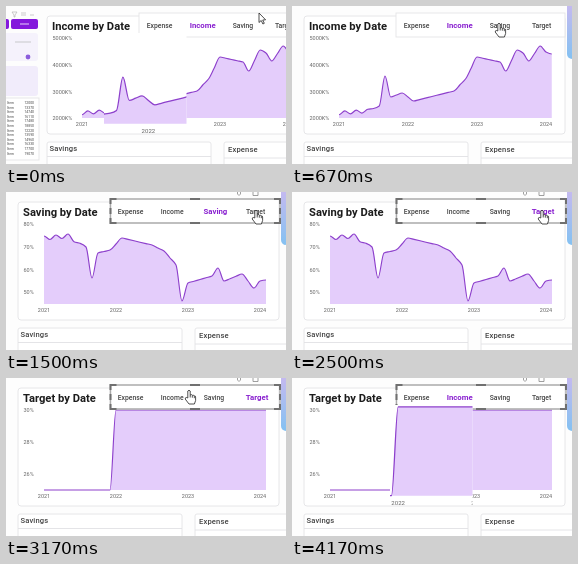
Recreate the animation shown at these times as an HTML page. Size 280x158 px, loop 4340 ms.

```html
<!DOCTYPE html>
<html lang="en">
<head>
<meta charset="utf-8">
<title>Dashboard tabs</title>
<style>
html, body { margin: 0; width: 100%; height: 100%; overflow: hidden; background: #fdfdfd; }
svg { display: block; width: 100vw; height: 100vh; }
text { font-family: Roboto, "Open Sans", sans-serif; fill: #444; }
.title { font-size: 11.2px; font-weight: 700; fill: #1c1c1c; }
.tab { font-size: 6.8px; font-weight: 500; text-anchor: middle; }
.tab.on { font-size: 7.8px; font-weight: 700; fill: #8a22d0; }
.axis { font-size: 5.5px; fill: #666; }
.year { text-anchor: middle; }
.head { font-size: 7.6px; font-weight: 500; letter-spacing: .15px; }
.tiny { font-size: 3.4px; text-anchor: end; }
.card { fill: #fff; stroke: #e4e4e6; stroke-width: .9; }
.area { fill: #e4cdfb; }
.line { fill: none; stroke: #8d40cc; stroke-width: 1.15; stroke-linejoin: round; }
</style>
</head>
<body>
<svg viewBox="0 0 280 158" preserveAspectRatio="none">
  <defs>
    <clipPath id="lens"><rect x="98" y="27" width="82.5" height="100"/></clipPath>
    <linearGradient id="side" x2="0" y2="1">
      <stop offset="0" stop-color="#cdb8f0"/><stop offset=".5" stop-color="#a9bdf0"/><stop offset="1" stop-color="#83c1f2"/>
    </linearGradient>
  </defs>
  <rect width="280" height="158" fill="#fdfdfd"/>

  <g id="menu">
    <path d="M6 6h5l-2 3v2h-1v-2zM15 7h5M15 9h5M24 9h4" fill="none" stroke="#aaa" stroke-width=".6"/>
    <rect x="-10" y="13" width="13" height="10" rx="2" fill="#8418dc"/>
    <rect x="5" y="13" width="27" height="10" rx="2" fill="#8418dc"/>
    <path d="M14 18h9" stroke="#e6d0fa"/>
    <rect x="-10" y="27" width="42" height="28" rx="3" fill="#f5f2fc"/>
    <rect x="-10" y="60" width="42" height="30" rx="3" fill="#f1ecfb"/>
    <path d="M9 36h16" stroke="#bbb" stroke-width=".8"/>
    <circle cx="22" cy="51" r="2.4" fill="#8b5cdc"/>
    <rect x="-10" y="92" width="43" height="62" class="card"/>
    <g id="rows"></g>
  </g>

  <g id="page">
    <rect x="12" y="10" width="261" height="118" rx="3" class="card"/>
    <g id="plot"></g>
    <rect x="12" y="136" width="164" height="40" rx="2" class="card"/>
    <rect x="189" y="136" width="164" height="40" rx="2" class="card"/>
    <path d="M12 150.5h164M189 152h164" stroke="#e1e1e5" stroke-width=".9"/>
    <text x="14.5" y="145" class="head">Savings</text>
    <text x="193" y="146" class="head">Expense</text>
    <rect x="275" y="-8" width="30" height="61" rx="5" fill="url(#side)"/>
  </g>

  <g id="front">
    <text id="title" x="17" y="24" class="title"></text>
    <rect x="104" y="7" width="169" height="24" class="card"/>
    <g id="tabs"></g>
    <path id="icons" d="M231.500 0v2l1.500 1.500 1.500-1.500v-2M247 0v3.500h5v-3.500" fill="none" stroke="#888" stroke-width=".8"/>
    <g id="frame" fill="none">
      <rect x="104.5" y="7" width="169.5" height="24" stroke="#aaa" stroke-width="1.4"/>
      <path d="M104.500 12v-5h6M184 7h10M268 7h6v5M274 16v6M274 26v5h-6M194 31h-10M110.500 31h-6v-5M104.500 22v-6" stroke="#707070" stroke-width="2"/>
    </g>
  </g>

  <g id="lensView" clip-path="url(#lens)">
    <rect x="98" y="27" width="85" height="100" fill="#fff"/>
    <g id="zoom"><use href="#plot"/></g>
  </g>

  <g id="hand" fill="#fff" stroke="#222" stroke-width=".8" stroke-linejoin="round">
    <path d="M-1.200 8V1Q0-.6 1.200 1V5Q2.500 4 3.300 5.300Q4.600 4.500 5.300 6Q6.500 5.600 6.600 7V10.500L5.400 14H0L-3.800 9Q-3.700 7.200-2.300 7.500Z"/>
    <path d="M1.200 5v2.500M3.300 5.500v2.200M5.300 6.200v2"/>
  </g>
  <path id="arrow" d="M0 0V9.500L2.200 7.500L3.900 11L5.300 10.300L3.700 7L6.600 6.800Z" fill="#fff" stroke="#222" stroke-width=".8"/>
</svg>
<script>
const LOOP = 4340, TICK = 1000 / 6, LAST = 25, MONTHS = 38, BASE = 112;
const $ = id => document.getElementById(id);
const label = (x, y, cls, s) => `<text x="${x}" y="${y}" class="${cls}">${s}</text>`;

// Linear interpolation through keys of the form [position, ...values].
function between(keys, pos) {
  const i = Math.max(1, keys.findIndex(k => k[0] >= pos));
  const [a, b] = [keys[i - 1], keys[i]];
  const u = (pos - a[0]) / (b[0] - a[0]);
  return a.slice(1).map((v, j) => v + (b[j + 1] - v) * u);
}

// Keys are [month, height]; ripple is the early month-to-month wobble.
const charts = {
  Income: {
    start: 47, month: 5.75, ripple: 1.7, top: 5000, step: 1000, unit: 'K%', gap: 26.8,
    keys: [[0, 107], [5, 105], [7, 100], [8, 70], [9, 91], [11, 87], [13, 95], [20, 85], [22, 73], [24, 51],
      [28, 56], [29, 65], [31, 44], [32, 47], [33, 55], [35, 40], [36, 46], [37, 48]]
  },
  Saving: {
    start: 38, month: 6, ripple: -2, top: 80, step: 10, unit: '%', gap: 22.8,
    keys: [[0, 46], [4, 44], [7, 55], [8, 86], [9, 61], [11, 58], [13, 46], [18, 53], [20, 59], [22, 73],
      [23, 109], [24, 91], [28, 84], [29, 76], [30, 89], [33, 82], [35, 96], [36, 89], [37, 88]]
  },
  Target: {
    start: 38, month: 6, ripple: 0, top: 30, step: 2, unit: '%', gap: 32.2,
    keys: [[0, BASE], [11, BASE], [12, 32], [37, 32]]
  }
};

// Monotone cubic through evenly spaced heights.
function smoothPath(x0, dx, ys) {
  const slope = ys.map((y, i) => {
    const before = y - ys[i - 1], after = ys[i + 1] - y;
    return before * after > 0 ? 2 * before * after / (before + after) : 0;
  });
  return ys.map((y, i) => {
    const x = x0 + i * dx;
    if (!i) return `M${x} ${y}`;
    return `C${x - dx * 2 / 3} ${ys[i - 1] + slope[i - 1] / 3} ${x - dx / 3} ${y - slope[i] / 3} ${x} ${y}`;
  }).join('');
}

function drawChart(name) {
  const { start, month, ripple, top, step, unit, gap, keys } = charts[name];
  const heights = Array.from({ length: MONTHS }, (_, m) =>
    between(keys, m)[0] + (m < 6 ? ripple * Math.cos(Math.PI * m) : 0));
  const path = smoothPath(start, month, heights);
  let marks = '';
  for (let i = 0; 34 + i * gap < 116; i++) marks += label(17.5, 34 + i * gap, 'axis', top - i * step + unit);
  for (let i = 0; i < 4; i++) marks += label(start + i * 12 * month, 120, 'axis year', 2021 + i);
  $('plot').innerHTML =
    `<path class="area" d="${path}V${BASE}H${start}Z"/><path class="line" d="${path}"/>${marks}`;
  $('title').textContent = name + ' by Date';
}

function drawTabs(active) {
  $('tabs').innerHTML = ['Expense', 'Income', 'Saving', 'Target'].map((s, i) => {
    const x = 124.5 + i * 41.7;
    return s === active ? label(x + 1.5, 22, 'tab on', s) : label(x, 22, 'tab', s);
  }).join('');
}

// Steps are [first tick, value]; values hold until the next step.
const chartSteps = [[0, 'Income'], [9, 'Saving'], [17, 'Target']];
const tabSteps = [[0, 'Income'], [5, 'Saving'], [14, 'Target'], [23, 'Income']];
const at = (steps, tick) => steps.findLast(s => s[0] <= tick)[1];

const pointer = [[0, 253, 7], [2, 207, 18], [4, 207, 17], [6, 250, 18], [16, 250, 18],
  [17, 185, 13], [18, 169, 13], [19, 183, 12], [LAST, 183, 12]];

const show = (id, on) => $(id).setAttribute('visibility', on ? 'visible' : 'hidden');
const move = (id, x, y = 0) => $(id).setAttribute('transform', `translate(${x} ${y})`);

$('rows').innerHTML = Array.from({ length: 12 }, (_, i) =>
  label(8, 98 + i * 4.6, 'tiny', 'Item') + label(28, 98 + i * 4.6, 'tiny', 12000 + i * 1370 % 8000)).join('');

function drawScene(tick) {
  drawChart(at(chartSteps, tick));
  drawTabs(at(tabSteps, tick));

  const pan = 29 * Math.max(0, 1 - tick / 2) ** 1.3;
  move('page', pan);
  move('front', pan);
  move('menu', 1.2 * (pan - 29));

  const scale = tick === 24 ? 1.05 : 1.11, focusX = 145 + .8 * pan, focusY = 60;
  show('lensView', tick < 4 || tick >= 24);
  $('zoom').setAttribute('transform',
    `translate(${focusX} ${focusY}) scale(${scale}) translate(${pan - focusX} ${-focusY})`);

  show('icons', tick >= 6);
  show('frame', tick >= 7);
  show('arrow', tick < 3);
  show('hand', tick >= 3 && tick < 24);
  for (const id of ['arrow', 'hand']) move(id, ...between(pointer, tick));
}

let shown;
function render() {
  // The small lead absorbs rounding at the tick boundaries.
  const tick = Math.min(LAST, Math.floor((performance.now() % LOOP + 4) / TICK));
  if (tick !== shown) drawScene(shown = tick);
  requestAnimationFrame(render);
}
render();
</script>
</body>
</html>
```
